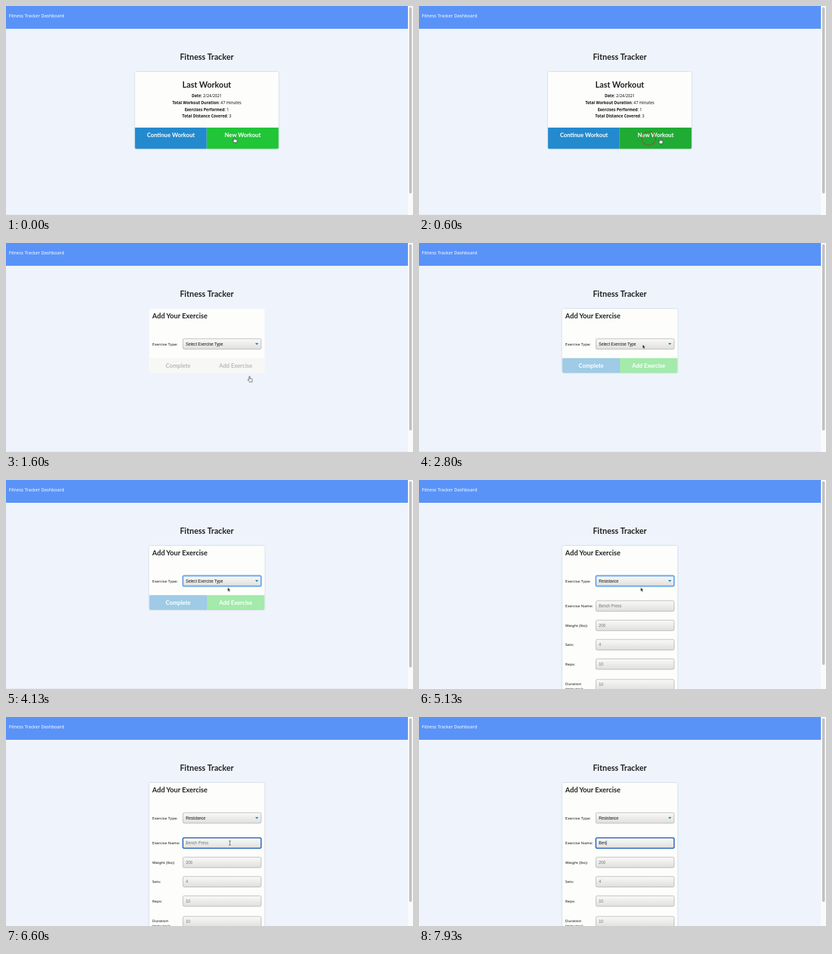
An HTML page for the animation above (8000 ms loop, 640x330 px).

```html
<!DOCTYPE html>
<html lang="en">
<head>
<meta charset="utf-8">
<title>Fitness Tracker</title>
<style>
html, body { margin: 0; width: 100%; height: 100%; overflow: hidden; background: #eff4fc; }
svg { display: block; width: 640px; height: 330px; }
text { font: 6.2px "Noto Sans", sans-serif; fill: #111; }
.brand { font-size: 7px; fill: #fff; }
.h1, .h2, .btn { font-family: Lato, sans-serif; font-weight: 700; fill: #212223; }
.h1 { font-size: 12.73px; }
.h2 { font-size: 10.9px; }
.btn { font-size: 9.1px; fill: #fff; }
.mid { text-anchor: middle; }
.label text { font-size: 6.1px; }
.value { font: 6.3px "Liberation Sans", Arial, sans-serif; fill: #111; }
.hint { fill: #757575; }
.bold { font-weight: 700; }
.card { fill: #fdfefc; filter: drop-shadow(0 .5px .8px #9aa4b4aa); }
.field { fill: url(#shade); stroke: #adadad; stroke-width: .8; }

/* every animation shares the same 8 s clock */
.t { animation: 8s step-end infinite; }
.smooth { animation-timing-function: linear; }
.home { animation-name: home; }
.form { animation-name: form; }
.short { animation-name: short; }
.long { animation-name: long; }
.new { animation-name: new; }
.loaded { animation-name: loaded; }
.blue { animation-name: blue; }
.green { animation-name: green; }
.ink { animation-name: ink; }
.selectRing { animation-name: selectRing; }
.nameRing { animation-name: nameRing; }
.empty { animation-name: empty; }
.b { animation-name: b; }
.e { animation-name: e; }
.n { animation-name: n; }
.caret { animation-name: caret; }
.cursor { animation-name: cursor; animation-timing-function: ease-in-out; }
.hand { animation-name: hand; }
.arrow { animation-name: arrow; }
.beam { animation-name: beam; }
.click { animation-name: click; }

@keyframes home { 0% { opacity: 1 } 19.1%, 100% { opacity: 0 } }
@keyframes form { 0% { opacity: 0 } 19.1%, 100% { opacity: 1 } }
@keyframes short { 0% { opacity: 1 } 56.5%, 100% { opacity: 0 } }
@keyframes long { 0% { opacity: 0 } 56.5%, 100% { opacity: 1 } }
@keyframes new { 0%, 4.6% { fill: #20c538 } 6%, 100% { fill: #1fab34 } }
@keyframes loaded { 0%, 20.3% { opacity: 0 } 21.6%, 100% { opacity: 1 } }
@keyframes blue { 0%, 20.3% { fill: #f7f8f6 } 21.6%, 100% { fill: #9fcbe6 } }
@keyframes green { 0%, 20.3% { fill: #f7f8f6 } 21.6%, 100% { fill: #a3eaab } }
@keyframes ink { 0%, 20.3% { fill: #b7b8b8 } 21.6%, 100% { fill: #fff } }
@keyframes selectRing { 0% { opacity: 0 } 41% { opacity: 1 } 72.5%, 100% { opacity: 0 } }
@keyframes nameRing { 0% { opacity: 0 } 72.5%, 100% { opacity: 1 } }
@keyframes empty { 0% { opacity: 1 } 90.6%, 100% { opacity: 0 } }
@keyframes b { 0% { fill: transparent } 90.6%, 100% { fill: #111 } }
@keyframes e { 0% { fill: transparent } 94%, 100% { fill: #111 } }
@keyframes n { 0% { fill: transparent } 98%, 100% { fill: #111 } }
@keyframes caret {
  0% { opacity: 0; transform: none }
  72.5% { opacity: 1; transform: none }
  78.75% { opacity: 0; transform: none }
  85% { opacity: 1; transform: none }
  90.6% { opacity: 1; transform: translateX(4.2px) }
  94% { opacity: 1; transform: translateX(7.7px) }
  98%, 100% { opacity: 1; transform: translateX(11.4px) }
}
@keyframes cursor {
  0%, 4.6% { transform: translate(358.2px, 207px) }
  7.4% { transform: translate(378.3px, 208.8px) }
  15%, 22.5% { transform: translate(382.2px, 210.6px) }
  32.5%, 41% { transform: translate(351.6px, 160.3px) }
  50%, 66% { transform: translate(348.6px, 169.6px) }
  71.5%, 100% { transform: translate(352px, 199px) }
}
@keyframes hand { 0% { opacity: 1 } 24.2%, 100% { opacity: 0 } }
@keyframes arrow { 0% { opacity: 0 } 24.2% { opacity: 1 } 70%, 100% { opacity: 0 } }
@keyframes beam { 0% { opacity: 0 } 70% { opacity: 1 } 90.6%, 100% { opacity: 0 } }
@keyframes click {
  0%, 4.59% { opacity: 0; transform: translate(361px, 209px) scale(.3) }
  4.6% { opacity: 1; transform: translate(361px, 209px) scale(.3) }
  7.5% { opacity: .9; transform: translate(361px, 209px) scale(1) }
  9% { opacity: 0; transform: translate(361px, 209px) scale(1.3) }
  40.49% { opacity: 0; transform: translate(352px, 160px) scale(.3) }
  40.5% { opacity: 1; transform: translate(352px, 160px) scale(.3) }
  43.4% { opacity: .9; transform: translate(352px, 160px) scale(1) }
  44.9% { opacity: 0; transform: translate(352px, 160px) scale(1.3) }
  71.99% { opacity: 0; transform: translate(352px, 199px) scale(.3) }
  72% { opacity: 1; transform: translate(352px, 199px) scale(.3) }
  74.9% { opacity: .9; transform: translate(352px, 199px) scale(1) }
  76.4%, 100% { opacity: 0; transform: translate(352px, 199px) scale(1.3) }
}
</style>
</head>
<body>
<svg viewBox="0 0 640 330">
  <defs>
    <linearGradient id="shade" x2="0" y2="1">
      <stop stop-color="#f9f9f8"/>
      <stop offset="1" stop-color="#dfdfde"/>
    </linearGradient>
    <rect id="box" x="278.2" y="-8.3" width="123" height="16.6" rx="2"/>
  </defs>

  <rect width="640" height="330" fill="#eff4fc"/>
  <rect width="632" height="36" fill="#5a93f8"/>
  <text class="brand" x="4.5" y="18.4">Fitness Tracker Dashboard</text>
  <text class="h1 mid" x="315.7" y="85.2">Fitness Tracker</text>
  <rect x="632" width="8" height="330" fill="#fafafa"/>
  <rect class="t short" x="634" y="2" width="4.2" height="294" rx="2.1" fill="#c1c1c1"/>
  <rect class="t long" x="634" y="2" width="4.2" height="290" rx="2.1" fill="#c1c1c1"/>
  <rect class="t short" y="329" width="632" height="1" fill="#e3e7ed"/>

  <g class="t home">
    <rect class="card" x="202.8" y="104" width="225.8" height="121.5" rx="2"/>
    <text class="h1 mid" x="315.7" y="128.6">Last Workout</text>
    <g class="mid">
      <text x="315.7" y="143.8"><tspan class="bold">Date</tspan>: 2/24/2021</text>
      <text x="315.7" y="154.8"><tspan class="bold">Total Workout Duration</tspan>: 47 minutes</text>
      <text x="315.7" y="165.5"><tspan class="bold">Exercises Performed</tspan>: 1</text>
      <text x="315.7" y="176.4"><tspan class="bold">Total Distance Covered</tspan>: 3</text>
    </g>
    <path d="M202.8 192H315.7V225.5H204.8a2 2 0 0 1-2-2Z" fill="#248ace"/>
    <path class="t smooth new" d="M315.7 192H428.6V223.5a2 2 0 0 1-2 2H315.7Z"/>
    <text class="btn mid" x="259.3" y="206.8">Continue Workout</text>
    <text class="btn mid" x="372.2" y="206.8">New Workout</text>
  </g>

  <g class="t form">
    <g class="t short">
      <rect class="card t smooth loaded" x="225.3" y="104" width="181.2" height="101" rx="2"/>
      <rect x="225.3" y="104" width="181.2" height="101" rx="2" fill="#fdfefc"/>
      <path class="t smooth blue" d="M225.3 181.7H316V205H227.3a2 2 0 0 1-2-2Z"/>
      <path class="t smooth green" d="M316 181.7H406.5V203a2 2 0 0 1-2 2H316Z"/>
      <text class="btn mid t smooth ink" x="270.6" y="196.6">Complete</text>
      <text class="btn mid t smooth ink" x="361" y="196.6">Add Exercise</text>
    </g>
    <g class="t long">
      <rect class="card" x="225.3" y="104" width="181.2" height="250" rx="2"/>
      <g class="label">
        <text x="230" y="201.2">Exercise Name:</text>
        <text x="230" y="231.8">Weight (lbs):</text>
        <text x="230" y="262.3">Sets:</text>
        <text x="230" y="292.9">Reps:</text>
        <text x="230" y="323.7">Duration</text>
        <text x="230" y="332">(minutes):</text>
      </g>
      <use href="#box" class="field" y="199"/>
      <use href="#box" class="field" y="229.6"/>
      <use href="#box" class="field" y="260.1"/>
      <use href="#box" class="field" y="290.7"/>
      <use href="#box" class="field" y="323.2"/>
      <text class="value hint t empty" x="282.7" y="201.2">Bench Press</text>
      <text class="value hint" x="282.7" y="231.8">200</text>
      <text class="value hint" x="282.7" y="262.3">4</text>
      <text class="value hint" x="282.7" y="292.9">10</text>
      <text class="value hint" x="282.7" y="325.4">10</text>
      <use href="#box" class="t nameRing" y="199" fill="none" stroke="#1f5fb8" stroke-width="1.5"/>
      <text class="value" x="282.7" y="201.2"><tspan class="t b">B</tspan><tspan class="t e">e</tspan><tspan class="t n">n</tspan></text>
      <rect class="t caret" x="282.7" y="195.4" width=".7" height="7.2" fill="#111"/>
    </g>

    <text class="h2" x="230" y="118.8">Add Your Exercise</text>
    <g class="label"><text x="230" y="161.5">Exercise Type:</text></g>
    <use href="#box" class="field" y="159.4"/>
    <use href="#box" class="t selectRing" y="159.4" fill="none" stroke="#5fa3ee" stroke-width="1.9"/>
    <text class="value t short" x="282.7" y="161.6">Select Exercise Type</text>
    <text class="value t long" x="282.7" y="161.6">Resistance</text>
    <path d="M391.9 158.1h5l-2.5 2.8Z" fill="#1c83b8"/>
  </g>

  <circle class="t smooth click" r="10.8" fill="none" stroke="#b3382c"/>
  <g class="t cursor" stroke-linejoin="round">
    <path class="t hand" d="M0 0.2Q.9-.5 1.5.4V3.3L4.3 3.9Q5.4 4.2 5.2 5.5L4.6 8.8H.8L-1.8 5.6Q-2.1 4.4-.9 4.7L0 5.4Z" fill="#fff" stroke="#222" stroke-width=".7"/>
    <path class="t arrow" d="M0 0V6.3L1.5 5 2.4 7.2 3.5 6.7 2.6 4.6H4.5Z" fill="#111" stroke="#fff" stroke-width=".5"/>
    <path class="t beam" d="M-1.5-3.5Q0-3.5 0-2.5Q0-3.5 1.5-3.5M0-2.5V2.5M-1.5 3.5Q0 3.5 0 2.5Q0 3.5 1.5 3.5" fill="none" stroke="#333" stroke-width=".7"/>
  </g>
</svg>
</body>
</html>
```
